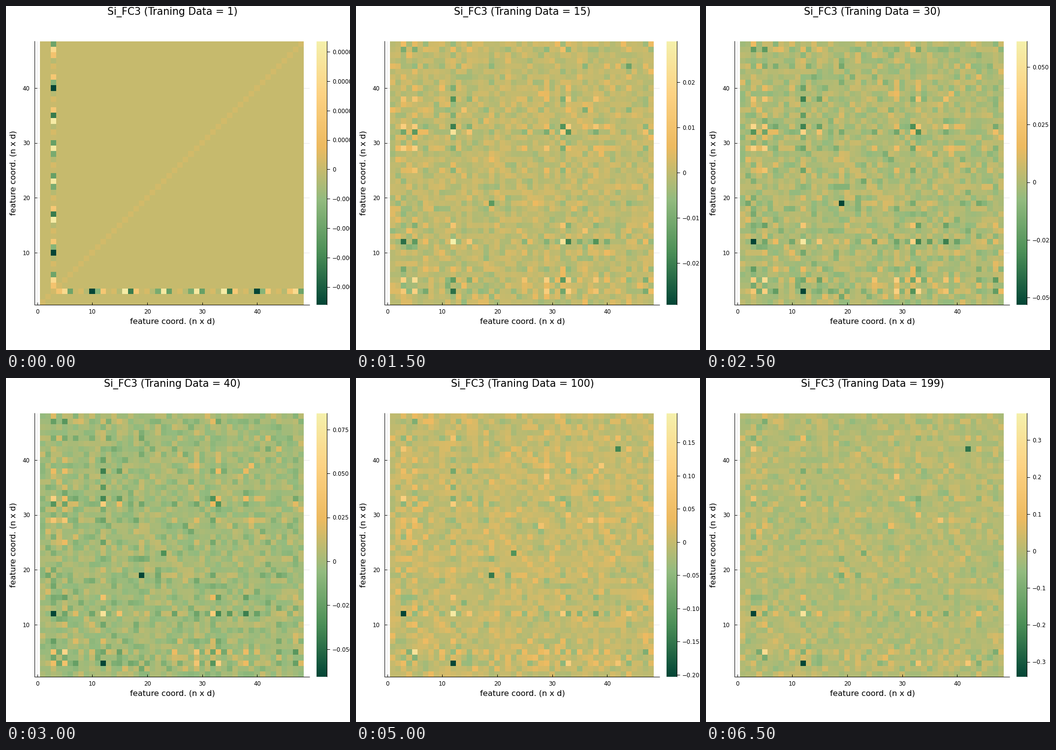
These frames come from a looping animation (699 by 700 pixels, 7 s). A matplotlib script:

```python
import math
import numpy as np
import matplotlib.pyplot as plt
from matplotlib.animation import FuncAnimation
from matplotlib.colors import LinearSegmentedColormap

W, H, SIZE = 699, 700, 48
COUNTS = [1, 5, 10, 15, 20, 30, 40, 50, 60, 80, 100, 120, 150, 199]
CMAP = LinearSegmentedColormap.from_list(
    "leaf", ["#034536", "#4c8f57", "#93bb7f", "#edba60", "#fdd283", "#f5f0ab"])

# Colour limits by training size, linear in between
KNOTS = [1, 5, 20, 40, 60, 100, 199]
LOW = [-4.6e-5, -0.00643, -0.0406, -0.0656, -0.0977, -0.2026, -0.3397]
HIGH = [4.365e-5, 0.01081, 0.0382, 0.0843, 0.1271, 0.1944, 0.373]

# Levels of feature 3 against the x, y, z of every second atom
ATOMS = {2: (68, 85, 30), 4: (0, 37, 71), 6: (97, 15, 72), 8: (33, 95, 28)}
WEAK = (52, 55, 48)

# Leading features of the few-sample and many-sample matrices
PLUS = {12: 0.79, 32: 0.58, 5: -0.43, 48: -0.4, 33: -0.38}
MINUS = {36: 0.61, 44: 0.6, 4: 0.55, 18: 0.4, 14: -0.4, 1: -0.38}
MAIN = {12: -0.69, 3: 0.65, 5: 0.55, 33: 0.5, 32: -0.5, 38: 0.4, 29: 0.38,
        15: -0.35, 47: -0.35, 7: -0.3, 25: 0.27}

# Pairs that stand out around one training size: i, j, strength, size
PAIRS = [(3, 12, -0.3, 199), (19, 19, -0.45, 45), (23, 23, -0.34, 70),
         (42, 42, -0.36, 150), (3, 42, 0.28, 190), (5, 5, 0.2, 199),
         (39, 39, 0.22, 65), (14, 14, -0.16, 80), (33, 33, -0.25, 150),
         (28, 28, 0.18, 130), (29, 37, 0.18, 130), (30, 33, 0.18, 140),
         (12, 44, 0.16, 140)]

rng = np.random.default_rng(5)


def vector(keys, spread):
    v = rng.normal(0, spread, SIZE)
    for k, x in keys.items():
        v[k - 1] = x
    return v


def symmetric():
    m = np.triu(np.clip(rng.normal(size=(SIZE, SIZE)), -2.5, 2.5))
    return m + np.triu(m, 1).T


plus, minus, main = (vector(k, 0.1) for k in (PLUS, MINUS, MAIN))
noise_a, noise_b, noise_c = (symmetric() for _ in range(3))
gain = np.ones(SIZE)
gain[[2, 3, 4, 11, 18, 43]] = 1.4


def first(zero):
    m = np.full((SIZE, SIZE), zero)
    np.fill_diagonal(m, zero + 0.027)
    for atom in range(2, 17):
        # the crystal repeats mirrored about atom 9
        part = ATOMS.get(min(atom, 18 - atom), WEAK)
        i = 3 * atom - 3
        m[2, i:i + 3] = m[i:i + 3, 2] = np.array(part) / 100
    return m


def few():
    return np.outer(plus, plus) - np.outer(minus, minus) + 0.034 * noise_a


def many(n):
    fade = np.full(SIZE, (20 / n) ** 0.3)
    fade[11] = 1
    turn = 0.6 * math.log(n / 20)
    noise = math.cos(turn) * noise_b + math.sin(turn) * noise_c
    spread = 0.047 * (20 / n) ** 0.18
    m = np.outer(main * fade, main * fade) + spread * noise * np.outer(gain, gain)
    for i, j, strength, size in PAIRS:
        d = strength * math.exp(-0.5 * (math.log(n / size) / 0.8) ** 2)
        m[i - 1, j - 1] += d
        if i != j:
            m[j - 1, i - 1] += d
    return m


def levels(n, zero):
    """Place of every cell on the colour scale, 0 to 1."""
    if n == 1:
        return first(zero)
    early = max(0, (20 - n) / 15)
    return zero + early * few() + (1 - early) * many(max(n, 20))


def nice_step(span):
    e = math.floor(math.log10(span)) - 2
    while True:
        for base, extra in ((1, 0), (2.5, 1), (5, 0)):
            step = base * 10.0 ** e
            if span / step <= 9.5:
                return step, max(0, extra - e)
        e += 1


plt.rcParams["font.family"] = "DejaVu Sans"
fig = plt.figure(figsize=(W / 100, H / 100), dpi=100, facecolor="white")
ax = fig.add_axes([0, 0, 1, 1])
ax.axis("off")
TICK, GUIDE, TITLE = 8.4, 11.7, 14.8


def px(v):
    return 63.9 + 11.165 * v


def py(v):
    return 614.4 - 11.18 * v


def line(xs, ys, z=4, **kw):
    return ax.plot(xs, ys, color="black", lw=0.72, zorder=z, snap=False,
                   solid_capstyle="butt", **kw)[0]


def label(x, y, s, size, **kw):
    return ax.text(x, y, s, fontsize=size, va="baseline", **kw)


def image(data, left, right):
    return ax.imshow(data, cmap=CMAP, vmin=0, vmax=1, origin="lower",
                     extent=(left, right, 608, 72), aspect="auto",
                     interpolation="nearest", zorder=2)


heat = image(np.zeros((SIZE, SIZE)), 69, 605)
image(np.linspace(0, 1, 256)[:, None], 631, 652)

line([58.5, 58.5], [71.5, 609])
line([58, 617.5], [608.5, 608.5])
line([652.5, 652.5], [71.5, 608.5])
for v in range(0, 50, 10):
    x = math.floor(px(v) + 0.2) + 0.5
    line([x, x], [72, 608], z=1, alpha=0.1)
    line([x, x], [603.5, 608.5])
    label(px(v), 625.5, str(v), TICK, ha="center")
    if v:
        y = math.floor(py(v)) + 0.5
        line([58, 617], [y, y], z=1, alpha=0.1)
        line([58.5, 63.5], [y, y])
        label(48.5, py(v) + 4.3, str(v), TICK, ha="right")

name = "feature coord. (n x d)"
label(338.5, 646.5, name, GUIDE, ha="center")
label(20, 340, name, GUIDE, ha="center", rotation=90, rotation_mode="anchor")
title = label(338, 18, "", TITLE, ha="center")
marks = [(line([652.5, 658.5], [0, 0]), label(663, 0, "", TICK, ha="left"))
         for _ in range(12)]

ax.set_xlim(0, W)
ax.set_ylim(H, 0)


def draw(i):
    n = COUNTS[i]
    lo, hi = np.interp(n, KNOTS, LOW), np.interp(n, KNOTS, HIGH)
    heat.set_data(levels(n, -lo / (hi - lo)))
    title.set_text(f"Si_FC3 (Traning Data = {n})")
    step, digits = nice_step(hi - lo)
    start = math.ceil(lo / step)
    for k, (tick, text) in enumerate(marks, start):
        v = k * step
        y = 608 - 536 * (v - lo) / (hi - lo)
        tick.set_visible(v <= hi)
        text.set_visible(v <= hi)
        tick.set_ydata([math.floor(y) + 0.5] * 2)
        text.set_y(y + 4.3)
        s = f"{v:.{digits}f}" if k else "0"
        text.set_text(s.replace("-", "\u2212"))
    return [heat, title]


anim = FuncAnimation(fig, draw, frames=len(COUNTS), interval=500,
                     repeat=True, repeat_delay=0, blit=False)
plt.show()
```
